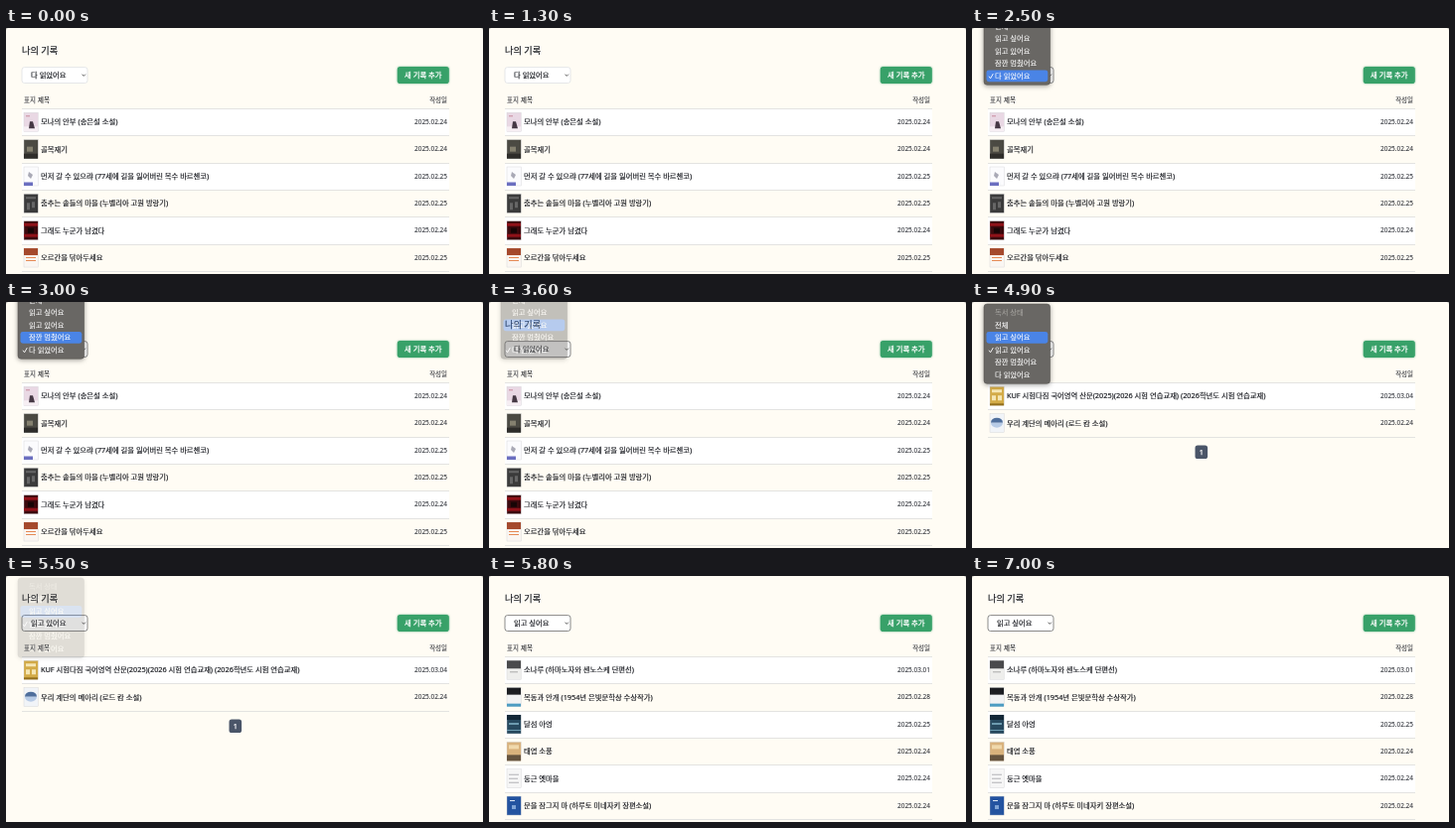
Write an HTML page that moves like this. It is 480 px wide and 248 px high and loops after 7100 ms.

```html
<!DOCTYPE html>
<html lang="ko">
<head>
<meta charset="utf-8">
<title>나의 기록</title>
<style>
  html, body { margin: 0; height: 100%; overflow: hidden; background: #a9a7a2; }
  svg { display: block; width: 480px; height: 248px; }
  text {
    font: 500 7.32px 'Noto Sans', 'Noto Sans CJK KR', 'Noto Sans CJK', sans-serif; white-space: pre;
    color: #1a1c22; fill: currentColor; stroke: currentColor; stroke-width: .18px;
  }
  .title { font-size: 9.2px; }
  .small { font-size: 6.46px; font-weight: 400; color: #33363d; stroke-width: .08px; }
  .end { text-anchor: end; }
  .mid { text-anchor: middle; }
  .strong { color: #fff; stroke-width: .25px; }
  .menu text { font-weight: 400; color: #fff; stroke-width: .1px; }
  .menu .off { color: #a3a19d; }
  .panel { filter: drop-shadow(0 1px 2.5px #0006); }
  .button { filter: drop-shadow(0 .4px .9px #38a169aa); }
</style>
</head>
<body>
<svg id="stage" viewBox="0 0 480 248"></svg>
<script>
const LOOP = 7100, ROW = 27.35, TOP = 81.4, ITEM = 12.5;
const ITEMS = ['독서 상태', '전체', '읽고 싶어요', '읽고 있어요', '잠깐 멈췄어요', '다 읽었어요'];

// Each book: title, date, cover colour, then colour/path pairs inside a 14 x 19 cover.
const LISTS = [
  [
    ['모나의 안부 (송은설 소설)', '2025.02.24', '#e9d8e4', '#f6eef3', 'M0 14h14v5H0z', '#453844', 'M6 9h3l2 7H5z', '#c98a9c', 'M2 3h4v1H2z'],
    ['골목재기', '2025.02.24', '#4b4a43', '#85816f', 'M3 7h6v5H3z', '#2e2d2a', 'M0 14h14v5H0z'],
    ['먼저 갈 수 있으랴 (77세에 길을 잃어버린 목수 바르첸코)', '2025.02.25', '#fbfbfd', '#6b6fc0', 'M0 15.5h9V19H0z', '#a9a9b6', 'M5 5l4 3-2 4-3-3z'],
    ['춤추는 솥들의 마을 (누벨리아 고원 방랑기)', '2025.02.25', '#3b3b3b', '#666', 'M2 3h10v2H2zM3 9h3v7H3zM8 8h3v6H8z'],
    ['그래도 누군가 남겼다', '2025.02.24', '#3a090d', '#8f1219', 'M0 2h14v3H0zM0 13h14v3H0z', '#170506', 'M4 7h6v5H4z'],
    ['오르간을 닦아두세요', '2025.02.25', '#faf6f2', '#a5492c', 'M0 0h14v7H0z', '#e58a55', 'M2 9h10v1H2zM2 12h10v1H2z']
  ],
  [
    ['KUF 시험다짐 국어영역 산문(2025)(2026 시험 연습교재) (2026학년도 시험 연습교재)', '2025.03.04', '#d3ab48', '#f5e6b4', 'M2 3h10v3H2zM2 9h4v5H2zM8 9h4v5H8z', '#94701d', 'M0 17h14v2H0z'],
    ['우리 계단의 메아리 (로드 캄 소설)', '2025.02.24', '#f1f4f8', '#4f6f9c', 'M1 9a6 5 0 0 1 12 0z', '#b7cbe6', 'M1 9h12a6 5 0 0 1-12 0z']
  ],
  [
    ['소나루 (하마노자와 센노스케 단편선)', '2025.03.01', '#eeeeec', '#4a4a4c', 'M0 0h14v8H0z', '#aaa', 'M3 11h8v1H3z'],
    ['목동과 안개 (1954년 은빛문학상 수상작가)', '2025.02.28', '#f1f2f3', '#1c1e22', 'M0 0h14v7H0z', '#4c9cc2', 'M0 16h14v3H0z'],
    ['달섬 야영', '2025.02.25', '#27495f', '#132736', 'M0 0h14v5H0z', '#6d9bb0', 'M2 8h10v2H2zM0 15h14v1H0z'],
    ['태엽 소풍', '2025.02.24', '#d9b27c', '#66543e', 'M0 13h14v6H0z', '#f0d9ac', 'M2 3h10v4H2z'],
    ['둥근 옛마을', '2025.02.24', '#f6f6f6', '#b2b2b6', 'M2 5h10v1H2zM2 9h9v1H2zM2 13h10v1H2z'],
    ['문을 잠그지 마 (하루토 미네자키 장편소설)', '2025.02.24', '#2353a0', '#e4ebf5', 'M3 4h5v1H3z', '#7fa4d6', 'M5 9h4v4H5z']
  ]
];

const text = (x, y, s, cls = '') => `<text x="${x}" y="${y}" class="${cls}">${s}</text>`;
const rect = (x, y, w, h, fill, more = '') =>
  `<rect x="${x}" y="${y}" width="${w}" height="${h}" fill="${fill}" ${more}/>`;
const rule = y => rect(16, Math.floor(y), 430, 1, '#e3e3e1');

function cover(y, color, shapes) {
  let out = rect(0, 0, 14.2, 19, color, 'stroke="#cfcfd2" stroke-width=".4"');
  for (let i = 0; i < shapes.length; i += 2) out += `<path fill="${shapes[i]}" d="${shapes[i + 1]}"/>`;
  return `<g transform="translate(18 ${y})">${out}</g>`;
}

function list(books) {
  let out = '';
  books.forEach(([name, date, color, ...shapes], i) => {
    const y = TOP + i * ROW;
    out += rect(16, y, 430, ROW, i % 2 ? 'none' : '#fff')
      + rule(y) + rule(y + ROW)
      + cover(y + 3.9, color, shapes)
      + text(35, y + 15.9, name)
      + text(444, y + 15.5, date, 'small end');
  });
  if (books.length < 6) {
    out += rect(224.5, 144.4, 12.6, 13.6, '#4a5568', 'rx="2.6"') + text(230.8, 153.9, '1', 'strong mid');
  }
  return `<g class="list">${out}</g>`;
}

const menu = rect(12, 2, 66.6, 80.3, '#696764', 'class="panel" rx="3.2" stroke="#504e4b" stroke-width=".5"')
  + '<rect id="mark" x="14.5" width="61.8" height="11.8" rx="2.4" fill="#4a84e6"/>'
  + ITEMS.map((s, i) => text(23, 13.4 + i * ITEM, s, i ? '' : 'off')).join('')
  + '<path id="check" d="M17 .4l1.6 2.1 2.7-4.7" fill="none" stroke="#fff" stroke-width=".9"/>';

const $ = id => document.getElementById(id);
$('stage').innerHTML = rect(0, 0, 480, 260, '#fffcf4', 'rx="2.5"')
  + text(16, 26, '나의 기록', 'title')
  + '<rect id="box" x="16" y="39.6" width="66" height="15.9" rx="2.6" fill="#fff" stroke-width=".8"/>'
  + '<text id="label" x="25" y="50.1"></text>'
  + '<path d="M76.5 46.7l1.7 1.7 1.7-1.7" fill="none" stroke="#333" stroke-width=".8"/>'
  + rect(393.8, 39.1, 52, 17, '#38a169', 'class="button" rx="2.8"')
  + text(419.8, 50.1, '새 기록 추가', 'strong mid')
  + text(18, 74.5, '표지', 'small')
  + '<text class="small" style="font-weight:500;color:#1a1c22" x="32" y="74.5">제목</text>'
  + text(444, 74.5, '작성일', 'small end')
  + LISTS.map(list).join('')
  + `<g id="menu" class="menu">${menu}</g>`;

const lists = document.querySelectorAll('.list');
const step = (t, ...times) => times.filter(at => t >= at).length;

function draw(now) {
  const t = Math.floor(now % LOOP / 100) * 100;
  const second = t >= 4600;
  const shown = step(t, 3900, 5800);
  lists.forEach((g, i) => g.style.display = i === shown ? '' : 'none');

  $('label').textContent = ITEMS[5 - [0, 2, 3][step(t, 3700, 5600)]];
  $('box').setAttribute('stroke', t < 1800 ? '#dfe1e4' : '#6c6c6c');

  const fade = ((second ? 5567 : 3733) - t) / 333;
  const hover = second ? 3 - step(t, 4800) : 5 - step(t, 2800, 3100);
  $('menu').setAttribute('opacity', t < 2500 ? 0 : Math.max(0, Math.min(1, fade)));
  $('menu').setAttribute('transform', `translate(0 ${second ? 0 : -2 * ITEM})`);
  $('mark').setAttribute('y', 4.9 + hover * ITEM);
  $('check').setAttribute('transform', `translate(0 ${10.8 + (second ? 3 : 5) * ITEM})`);
}

function tick(now) {
  draw(now);
  requestAnimationFrame(tick);
}
draw(0);
requestAnimationFrame(tick);
</script>
</body>
</html>
```
